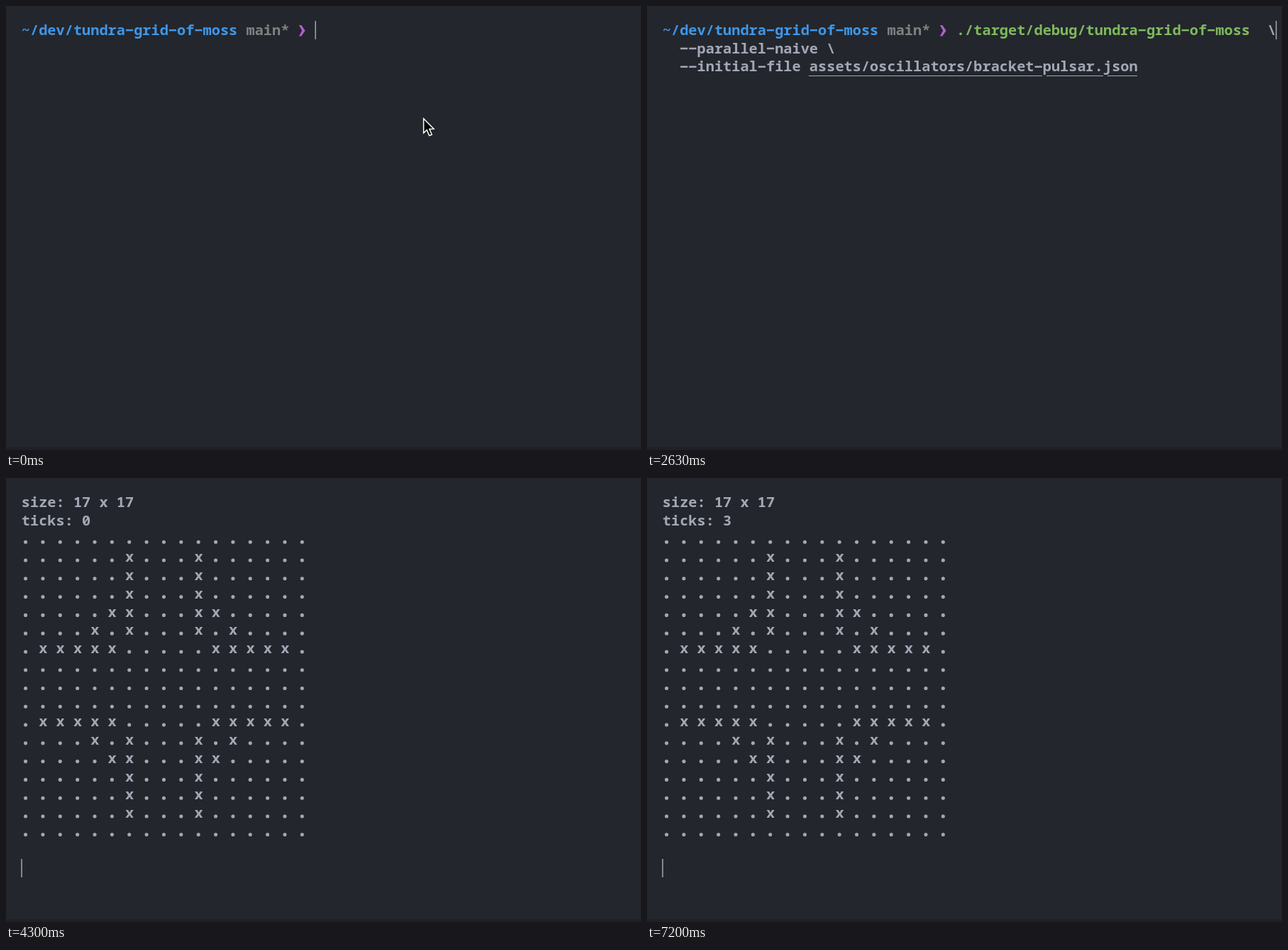
An HTML page with a canvas for the animation above (8000 ms loop, 895 by 626 pixels).

```html
<!DOCTYPE html>
<html lang="en">
<head>
<meta charset="utf-8">
<title>Cellular automaton in a terminal</title>
<style>
  html, body { margin: 0; width: 100%; height: 100%; overflow: hidden; background: #23262d; }
  canvas { display: block; }
</style>
</head>
<body>
<canvas id="stage" width="895" height="626"></canvas>
<script>
const ctx = document.getElementById('stage').getContext('2d');

const LOOP = 8000;
const CELL = 12.18, LINE = 25.78;
const LEFT = 21.8, BASELINE = 40.9;
const GRID = 17, MID = 8;
const COLORS = {
  back: '#23262d', edge: '#211f27', text: '#a2a8b5', path: '#3f97e8',
  branch: '#808080', prompt: '#b35fd0', valid: '#7fb95c', caret: '#b4b9c4'
};
const PROJECT = 'tundra-grid-of-moss';
const COMMAND = './target/debug/' + PROJECT;

// Times in ms
const BEAM = 1200, HIDE = 2140, PASTE = 2430, HIGHLIGHT = 2470, ENTER = 4100;
const TICKS = [4230, 5200, 6200, 7200];

const colX = col => LEFT + col * CELL;

function rect(x, y, w, h, color) {
  ctx.fillStyle = color;
  ctx.fillRect(x, y, w, h);
}

// Hyphens nearly fill their cell, as in a coding font.
function write(text, col, line, color) {
  const y = BASELINE + line * LINE;
  ctx.fillStyle = color;
  [...text].forEach((char, i) => {
    const x = colX(col + i);
    if (char === '-') ctx.fillRect(x + 1, y - 8, CELL - 2, 2.5);
    else if (char !== ' ') ctx.fillText(char, x, y);
  });
}

function caret(col, line) {
  rect(colX(col) - 0.4, Math.round(21.3 + line * LINE), 1.3, 26, COLORS.caret);
}

function polygon(points) {
  ctx.beginPath();
  points.forEach(([x, y]) => ctx.lineTo(x, y));
  ctx.closePath();
}

function drawPrompt() {
  write('~/dev/' + PROJECT, 0, 0, COLORS.path);
  write('main*', 26, 0, COLORS.branch);
  polygon([[413, 27], [416.3, 27], [421.6, 34.8], [416.3, 42.6], [413, 42.6], [417.2, 34.8]]);
  ctx.fillStyle = COLORS.prompt;
  ctx.fill();
}

function drawCommand(t) {
  const done = t >= HIGHLIGHT;
  const valid = done ? COMMAND.length : 5;
  write(COMMAND.slice(0, valid), 34, 0, COLORS.valid);
  write(COMMAND.slice(valid), 34 + valid, 0, COLORS.text);
  write('\\', 70, 0, COLORS.text);
  write('--parallel-naive \\', 2, 1, COLORS.text);
  write('--initial-file assets/oscillators/bracket-pulsar.json', 2, 2, COLORS.text);
  if (done) {
    // The underline breaks around descenders.
    [[228, 557], [563, 643], [649, 691]].forEach(([from, to]) =>
      rect(from, 98, to - from, 1, COLORS.text));
  }
}

function drawArrow(x, y) {
  ctx.save();
  ctx.translate(x, y);
  polygon([[0.6, 0.8], [0.6, 21], [5.2, 16.8], [8.6, 24.8], [12.2, 23.3], [8.8, 15.5], [15, 15.3]]);
  ctx.fillStyle = '#000';
  ctx.fill();
  ctx.strokeStyle = '#fff';
  ctx.lineWidth = 1.5;
  ctx.stroke();
  ctx.restore();
}

function drawBeam(x, y) {
  ctx.save();
  ctx.translate(x, y);
  ctx.beginPath();
  for (const s of [-1, 1]) {
    for (const side of [-1, 1]) {
      ctx.moveTo(side * 4.8, s * 11);
      ctx.quadraticCurveTo(0, s * 11, 0, s * 7);
    }
  }
  ctx.moveTo(0, -8);
  ctx.lineTo(0, 8);
  ctx.moveTo(-2.2, 0);
  ctx.lineTo(2.2, 0);
  ctx.lineCap = 'round';
  for (const [color, width] of [['#fff', 4.2], ['#16181d', 1.6]]) {
    ctx.strokeStyle = color;
    ctx.lineWidth = width;
    ctx.stroke();
  }
  ctx.restore();
}

function drawPointer(t) {
  if (t < BEAM) return drawArrow(588, 158);
  if (t >= HIDE) return;
  const p = Math.min(1, (t - BEAM) / 170);
  const ease = p * (2 - p);
  drawBeam(588.4 + ease, 158 + 3 * ease);
}

// One octant of offsets from the centre, mirrored eight ways.
function seedGrid() {
  const grid = Array.from({ length: GRID }, () => Array(GRID).fill(0));
  for (const [a, b] of [[7, 2], [6, 2], [5, 2], [4, 2], [4, 3], [3, 2]]) {
    for (const s of [-1, 1]) {
      for (const r of [-1, 1]) {
        grid[MID + s * a][MID + r * b] = 1;
        grid[MID + r * b][MID + s * a] = 1;
      }
    }
  }
  return grid;
}

function neighbours(grid, row, col) {
  let sum = -grid[row][col];
  for (let r = row - 1; r <= row + 1; r++)
    for (let c = col - 1; c <= col + 1; c++) sum += grid[r]?.[c] ?? 0;
  return sum;
}

const nextGrid = grid => grid.map((cells, row) => cells.map((alive, col) => {
  const n = neighbours(grid, row, col);
  return n === 3 || (alive && n === 2) ? 1 : 0;
}));

const generations = [seedGrid()];
while (generations.length < TICKS.length) generations.push(nextGrid(generations.at(-1)));

function drawGrid(tick) {
  write(`size: ${GRID} x ${GRID}`, 0, 0, COLORS.text);
  write(`ticks: ${tick}`, 0, 1, COLORS.text);
  generations[tick].forEach((cells, row) => cells.forEach((alive, col) => {
    if (alive) return write('x', col * 2, row + 2, COLORS.text);
    ctx.beginPath();
    ctx.arc(colX(col * 2) + 5.8, BASELINE + (row + 2) * LINE - 2.2, 2.55, 0, Math.PI * 2);
    ctx.fillStyle = COLORS.text;
    ctx.fill();
  }));
  caret(0, 20);
}

function draw(t) {
  rect(0, 0, 895, 626, COLORS.back);
  rect(0, 622, 895, 4, COLORS.edge);
  ctx.font = 'bold 20.3px "Noto Sans Mono", "DejaVu Sans Mono", monospace';
  const tick = TICKS.filter(time => t >= time).length - 1;
  if (tick >= 0) return drawGrid(tick);
  drawPrompt();
  if (t >= PASTE) drawCommand(t);
  if (t >= ENTER) caret(0, 3);
  else caret(t >= PASTE ? 71 : 34, 0);
  drawPointer(t);
}

const start = performance.now();
function frame() {
  draw((performance.now() - start) % LOOP);
  requestAnimationFrame(frame);
}
frame();
</script>
</body>
</html>
```
